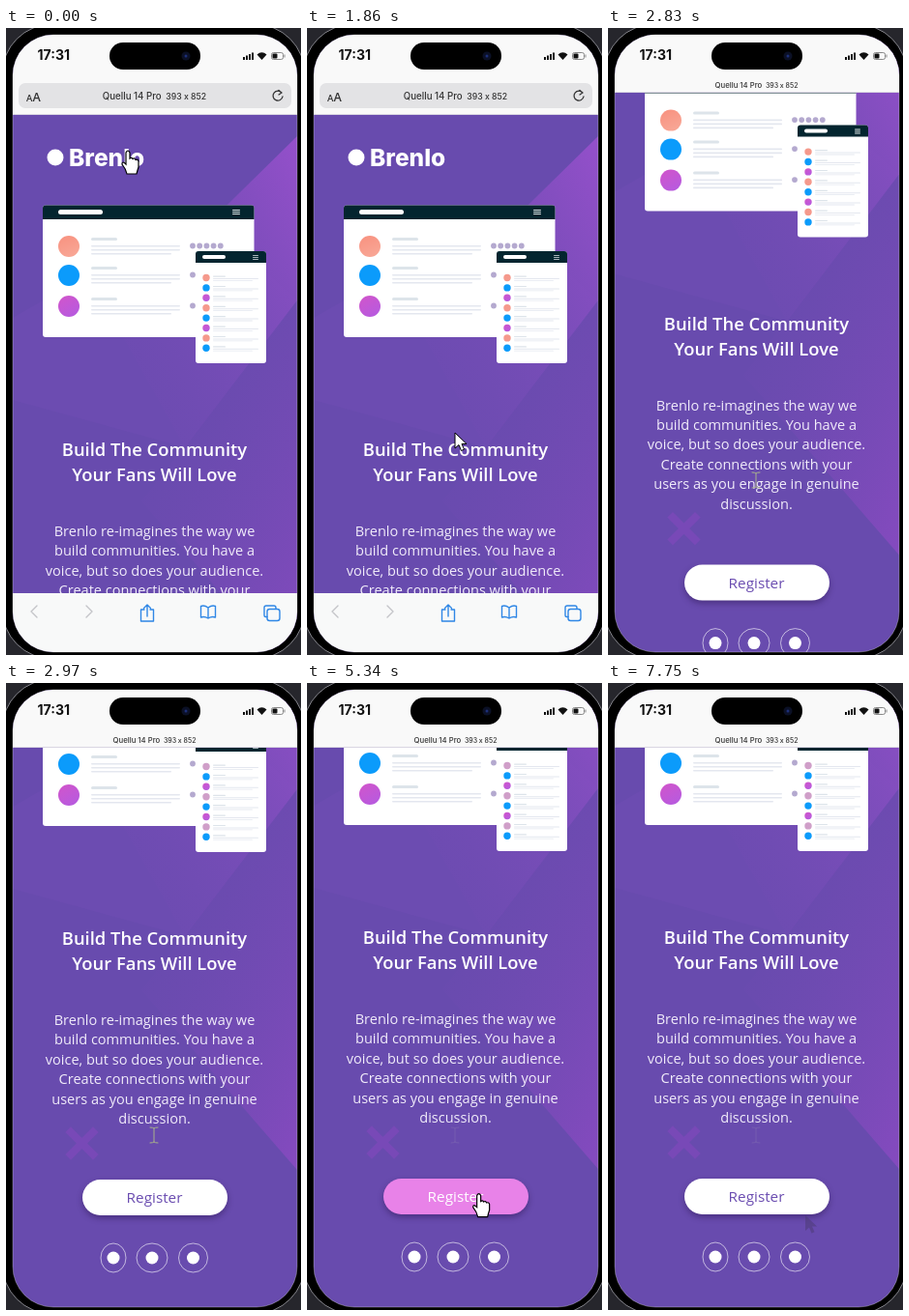
Animation of 305 by 649 pixels, one loop 8.14 s. Source, as an HTML page:

```html
<!DOCTYPE html>
<html lang="en">
<head>
<meta charset="utf-8">
<title>Mobile landing page</title>
<style>
  html, body { margin: 0; width: 100%; height: 100%; overflow: hidden; background: #26262c; }
  svg { display: block; width: 100vw; height: 100vh; }
  text { font-family: "Open Sans", "Noto Sans", sans-serif; }
  .ui { font-family: Inter, Roboto, sans-serif; }
  .mid { text-anchor: middle; }
  .line { fill: none; stroke-linecap: round; stroke-linejoin: round; }
  #button rect { filter: drop-shadow(0 3px 3px rgba(30, 10, 60, .4)); }
</style>
</head>
<body>
<svg viewBox="0 0 305 649" preserveAspectRatio="none">
  <defs>
    <clipPath id="screen"><rect x="7" y="7" width="294" height="639" rx="42"/></clipPath>
    <linearGradient id="salmon" x2=".4" y2="1"><stop stop-color="#f8917f"/><stop offset="1" stop-color="#f8a594"/></linearGradient>
    <linearGradient id="magenta" x2=".6" y2="1"><stop stop-color="#d255ca"/><stop offset="1" stop-color="#b85ade"/></linearGradient>
    <linearGradient id="upperGlow" x1="1" y1="0" x2=".1" y2=".8"><stop stop-color="#9550cb"/><stop offset="1" stop-color="#704bb2" stop-opacity=".2"/></linearGradient>
    <linearGradient id="lowerGlow" x1="1" y1="1" x2=".3" y2=".2"><stop stop-color="#854abf"/><stop offset="1" stop-color="#704bb2" stop-opacity=".1"/></linearGradient>
    <path id="arrow" d="M0 0V16L4 12.5L6.5 18.5L9.5 17.2L7 11.5H12Z"/>
    <path id="hand" d="M-2 2Q0-2 2 2V8Q4 6.5 5 8.5Q7 7 8 9.5Q10.5 8.5 11 11V17Q10 20 9 24H-1Q-2 19-6 14Q-6 10-2 14Z"/>
    <path id="beam" d="M-4-8Q-1-8 0-7Q1-8 4-8M0-7V7M-4 8Q-1 8 0 7Q1 8 4 8"/>
  </defs>

  <rect x="-4" y="-4" width="313" height="657" rx="52" fill="#000" stroke="#85858c"/>

  <g clip-path="url(#screen)">
    <rect width="305" height="649" fill="#684bae"/>
    <g id="page">
      <path d="M7 300L200 190L301 282L185 434L7 385Z" fill="#8450c0" opacity=".16"/>
      <path d="M301 112L110 300L185 434L301 282Z" fill="url(#upperGlow)"/>
      <path d="M301 282L140 490L301 676Z" fill="url(#lowerGlow)"/>
      <path d="M67 637L90 660M90 637L67 660" stroke="#7849b7" stroke-width="8" stroke-linecap="square"/>

      <circle cx="51" cy="134" r="8.5" fill="#fff"/>
      <text class="ui" x="65" y="142.5" font-size="24.5" font-weight="800" fill="#fff">Brenlo</text>

      <g id="mockup"></g>

      <g class="mid" fill="#fff" font-size="18.4" font-weight="600">
        <text x="153.5" y="443">Build The Community</text>
        <text x="153.5" y="469">Your Fans Will Love</text>
      </g>
      <g id="copy" class="mid" fill="#f1ecfa" font-size="14.55"></g>

      <g id="button">
        <rect x="79" y="686" width="150" height="37" rx="18.5"/>
        <text class="mid" x="153.5" y="710" font-size="15.3">Register</text>
      </g>
      <g id="social"></g>
    </g>

    <g id="ghosts">
      <use href="#beam" class="line" transform="translate(153 468)" stroke="#a9a0b8" opacity=".2"/>
      <use href="#arrow" transform="translate(204 551)" fill="#4a3a70" opacity=".5"/>
    </g>

    <g id="toolbar">
      <rect x="7" y="585" width="294" height="70" fill="#f8f9f9"/>
      <g class="line" stroke="#2f87e6" stroke-width="1.4">
        <path d="M32 598L26 604L32 610M83 598L89 604L83 610" stroke="#c3c4c8"/>
        <path d="M143 602H139.500V614H152.500V602H149M146 609V597M142.500 600.500L146 597L149.500 600.500"/>
        <path d="M209 600Q205 597 201.500 598.500V610Q205 608.500 209 611Q213 608.500 216.500 610V598.500Q213 597 209 600V611"/>
        <rect x="270" y="601.500" width="13" height="12" rx="2.500"/>
        <path d="M270 609.500H268.500Q267 609.500 267 608V600Q267 598 269 598H277Q279 598 279 600V601"/>
      </g>
    </g>

    <rect id="header" x="7" width="294" fill="#f9f9f9"/>
    <path id="divider" d="M7 0H301" stroke="#d9d5e2"/>
    <g id="address">
      <rect y="57" height="26" rx="7" fill="#e3e3e5"/>
      <g id="aa" class="ui" fill="#333" font-weight="600">
        <text x="21" y="75.500" font-size="9.500">A</text><text x="27.500" y="75.500" font-size="12.500">A</text>
      </g>
      <path id="reload" class="line" d="M285 67A5 5 0 1 0 286 71M282 64.500L285 67L282 69" stroke="#333" stroke-width="1.300"/>
    </g>
    <text id="device" class="ui mid" y="3.800" font-size="9.700" font-weight="500" fill="#333">Quellu 14 Pro <tspan dx="2" font-size="8.700">393 x 852</tspan></text>

    <text class="ui" x="32.500" y="33" font-size="14" font-weight="700" fill="#111">17:31</text>
    <rect x="107" y="15" width="94" height="28" rx="14"/>
    <circle cx="186" cy="29" r="4.500" fill="#0b1026"/><circle cx="186" cy="29" r="1.500" fill="#1c2f78"/>
    <g fill="#111">
      <path d="M245 30H247V33H245ZM248 28.500H250V33H248ZM251 27H253V33H251ZM254 25.500H256V33H254Z"/>
      <path d="M264.500 33L259.500 27.500Q264.500 23 269.500 27.500Z"/>
      <rect x="274.500" y="25.500" width="12" height="7" rx="2" fill="none" stroke="#888"/>
      <rect x="275.500" y="26.500" width="5" height="5" rx="1"/><rect x="287.500" y="27.500" width="1" height="3" fill="#888"/>
    </g>
  </g>
  <rect x="7" y="7" width="294" height="639" rx="42" fill="none" stroke="#fff" opacity=".3"/>

  <g id="cursor">
    <use href="#arrow" fill="#fff" stroke="#000"/>
    <use href="#hand" fill="#fff" stroke="#000" stroke-width="1.200"/>
    <use href="#beam" class="line" stroke="#a9b38a"/>
  </g>
</svg>

<script>
const LOOP = 8140;
const $ = id => document.getElementById(id);
const clamp = v => Math.max(0, Math.min(1, v));
const bar = (x, y, w, h, fill, rx = h / 2) =>
  `<rect x="${x}" y="${y}" width="${w}" height="${h}" rx="${rx}" fill="${fill}"/>`;
const dot = (x, y, r, fill) => `<circle cx="${x}" cy="${y}" r="${r}" fill="${fill}"/>`;

function windowFrame(x, y, w, h, top) {
  return bar(x, y, w, h, '#fff', 3) +
    `<path d="M${x} ${y + top}V${y + 3}q0-3 3-3h${w - 6}q3 0 3 3V${y + top}Z" fill="#03252f"/>`;
}

function mockup() {
  const tones = ['url(#salmon)', '#0b9bfb', 'url(#magenta)'];
  const smallTones = ['var(--smallSalmon)', ...tones.slice(1)];
  const dark = '#dde4ea', pale = '#e4e7ef';
  let out = windowFrame(38, 183.5, 218.5, 136.5, 14.5) + bar(54, 188, 46, 5, '#fff');
  for (const y of [188, 190, 192]) out += bar(234, y, 8, 1, '#dfe5e6');
  [226, 256, 288].forEach((y, i) => {
    out += dot(65, y, 11, tones[i]) + bar(88, y - 9, 27, 3, dark);
    [92, 92, 83].forEach((w, n) => out += bar(88, y - 1 + n * 4, w, 1.6, pale));
    for (let n = 0; n < (i ? 1 : 5); n++) out += dot(193 + n * 7.2, y - .5, 2.9, '#b4a9cf');
  });
  out += windowFrame(196, 231, 73, 116, 12) + bar(203, 235, 24, 4, '#fff');
  for (const y of [235, 237, 239]) out += bar(255, y, 6, .8, '#dfe5e6');
  for (let i = 0; i < 8; i++) {
    const y = 258.5 + i * 10.4;
    out += dot(207, y, 3.7, smallTones[i % 3]) +
      bar(214, y - 2, 13, 1.2, dark) + bar(214, y + .5, 47, 1, pale) + bar(214, y + 2.5, 41, .8, pale);
  }
  return out;
}

const copy = [
  'Brenlo re-imagines the way we', 'build communities. You have a', 'voice, but so does your audience.',
  'Create connections with your', 'users as you engage in genuine', 'discussion.'];

$('mockup').innerHTML = mockup();
$('copy').innerHTML = copy.map((s, i) => `<text x="153.5" y="${526 + i * 20.4}">${s}</text>`).join('');
$('social').innerHTML = [[111, 13], [151, 16], [193.5, 15]].map(([x, rx]) =>
  `<g><ellipse cx="${x}" cy="767" rx="${rx}" ry="15" fill="none" stroke="currentColor" opacity=".6"/>` +
  dot(x, 767, 6.5, 'currentColor') + '</g>').join('');

const ARROW = 0, HAND = 1, BEAM = 2;
// time, x, y, shape until the next point
const cursorPath = [
  [0, 126, 127, HAND], [70, 126, 127, HAND], [130, 114, 122, HAND], [250, 114, 122, HAND],
  [500, 102, 144, ARROW], [750, 85, 168, ARROW], [1030, 61, 187, ARROW], [1070, 61, 187, ARROW],
  [1300, 120, 230, ARROW], [1550, 186, 320, ARROW], [1700, 175, 390, ARROW], [1860, 153, 419, ARROW],
  [1900, 153, 419, ARROW], [1970, 146, 455, BEAM], [2170, 146, 455, BEAM], [2410, 153, 468, BEAM],
  [3050, 153, 468, BEAM], [3390, 95, 400, BEAM], [3550, 26, 385, ARROW], [3720, 70, 320, ARROW],
  [3850, 150, 350, BEAM], [4040, 205, 400, BEAM], [4240, 234, 440, BEAM], [4280, 234, 440, BEAM],
  [4430, 228, 480, ARROW], [4600, 200, 518, HAND], [4870, 160, 522, HAND], [5230, 160, 522, HAND],
  [5450, 195, 535, HAND], [5550, 204, 551, ARROW], [5750, 200, 572, ARROW], [5850, 195, 590, HAND],
  [6030, 185, 600, HAND], [6170, 157, 601, HAND], [6450, 115, 598, HAND], [6860, 111, 598, HAND],
  [7110, 111, 598, HAND], [7350, 150, 605, HAND], [7500, 190, 610, HAND], [7570, 214, 622, ARROW],
  [7720, 262, 649, ARROW], [7745, 270, 700, ARROW]];
const scrollPath = [[2600, 0], [2690, 35], [2760, 85], [2830, 130], [2900, 158], [2970, 172], [3060, 173]];

function sample(path, t) {
  const next = path.findIndex(p => p[0] > t);
  if (next < 0) return path[path.length - 1].slice(1);
  if (next === 0) return path[0].slice(1);
  const a = path[next - 1], b = path[next], k = (t - a[0]) / (b[0] - a[0]);
  return a.slice(1).map((v, i) => i === 2 ? v : v + (b[i + 1] - v) * k);
}

const FADE = 200;
const hover = (t, spans) => Math.max(...spans.map(([on, off]) =>
  Math.min(clamp((t - on) / FADE), 1 - clamp((t - off) / FADE))));
const mix = (from, to, k) => `color-mix(in srgb, ${to} ${k * 100}%, ${from})`;
const PINK = '#e882e8';
const buttonHover = [[4580, 5490]];
const socialHover = [[[6350, 7250]], [[6150, 6300], [7260, 7420]], [[5850, 6090], [7430, 7545]]];

function drawChrome(scroll) {
  const p = clamp(scroll / 100), top = 90 - 23 * p;
  $('header').setAttribute('height', top);
  $('divider').setAttribute('transform', `translate(0 ${top - .5})`);
  const field = $('address').firstElementChild;
  field.setAttribute('x', 13 + 23 * p);
  field.setAttribute('width', 282 - 46 * p);
  $('address').setAttribute('transform', `translate(0 ${-9 * p})`);
  $('address').style.opacity = clamp(1.6 - 1.6 * p);
  $('aa').setAttribute('transform', `translate(${25 * p} 0)`);
  $('reload').setAttribute('transform', `translate(${-24 * p} 0)`);
  $('device').setAttribute('transform', `translate(153.5 ${70 - 11 * p}) scale(${1 - .2 * p})`);
  $('toolbar').setAttribute('transform', `translate(0 ${66 * p ** 1.8})`);
}

function draw(t) {
  const [scroll] = sample(scrollPath, t);
  $('page').setAttribute('transform', `translate(0 ${-scroll})`);
  $('mockup').style.setProperty('--smallSalmon', t < 2900 ? '#f5998c' : '#d09fc9');
  drawChrome(scroll);

  const [x, y, shape] = sample(cursorPath, t);
  $('cursor').setAttribute('transform', `translate(${x} ${y})`);
  [...$('cursor').children].forEach((el, i) => el.style.display = i === shape ? '' : 'none');
  [3060, 5570].forEach((start, i) => $('ghosts').children[i].style.display = t > start ? '' : 'none');

  const k = hover(t, buttonHover), [face, label] = $('button').children;
  face.style.fill = mix('#fff', PINK, k);
  label.style.fill = mix('#6a4cb0', '#fff', k);
  [...$('social').children].forEach((el, i) => el.style.color = mix('#fff', PINK, hover(t, socialHover[i])));
}

function tick() {
  draw(performance.now() % LOOP);
  requestAnimationFrame(tick);
}
tick();
</script>
</body>
</html>
```
